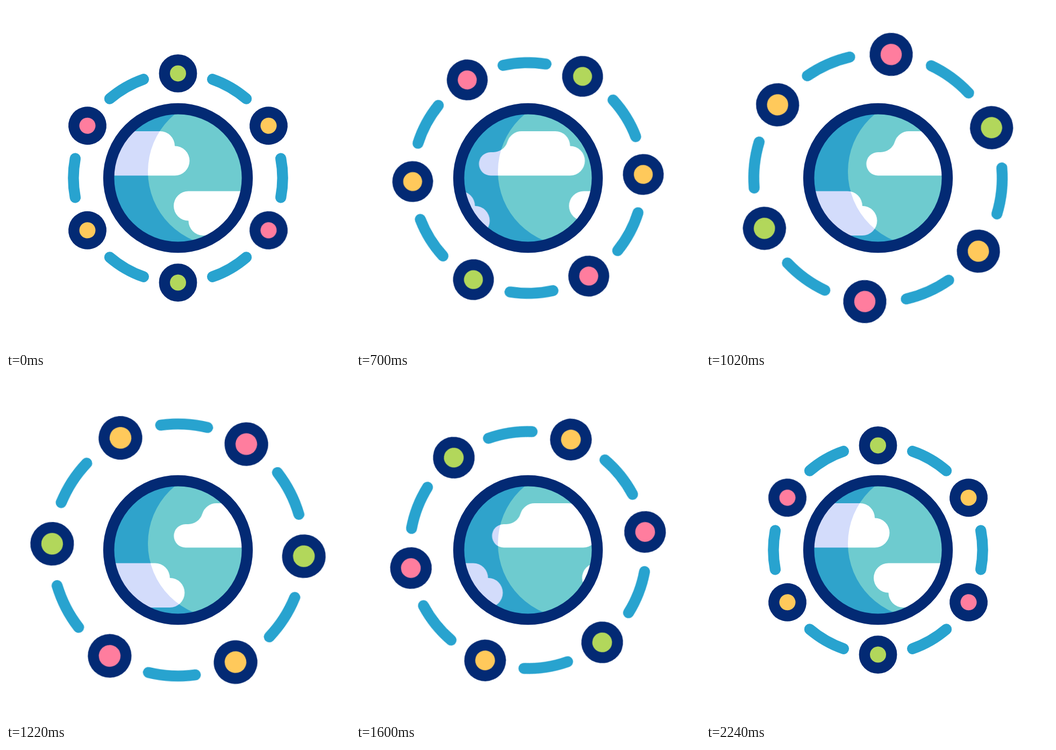
An HTML page without scripts for the animation above (2.4 s loop, 640 px wide and 640 px high).

```html
<!DOCTYPE html>
<html lang="en">
<head>
<meta charset="utf-8">
<title>Connected globe</title>
<style>
  html, body { margin: 0; width: 100%; height: 100%; overflow: hidden; background: #fff; }
  svg { display: block; width: 100vw; height: 100vh; }

  .spin, .grow, .drift {
    transform-origin: 0 0;
    animation: 2400ms cubic-bezier(.3333, 0, .6667, 1) infinite;
  }
  .spin { animation-name: spin; }
  .grow { animation-name: grow; }
  .drift { animation-name: drift; }

  /* rest until 200 ms, peak at 1200 ms, rest from 2200 ms */
  @keyframes spin {
    0%, 8.3333% { transform: rotate(0deg); }
    91.6667%, 100% { transform: rotate(180deg); }
  }
  @keyframes grow {
    0%, 8.3333%, 91.6667%, 100% { transform: scale(1); }
    50% { transform: scale(1.205); }
  }
  @keyframes drift {
    0%, 8.3333%, 91.6667%, 100% { transform: translateX(0); }
    50% { transform: translateX(168px); }
  }

  .node, .dash { stroke-width: 20.4; vector-effect: non-scaling-stroke; }
  .node { stroke: #032a74; }
  .dash { fill: none; stroke: #28a3cf; stroke-linecap: round; }
  .green { fill: #b2d75b; }
  .yellow { fill: #ffc95b; }
  .pink { fill: #ff7d9e; }
</style>
</head>
<body>
<svg viewBox="0 0 640 640">
  <defs>
    <clipPath id="disc"><circle cx="320" cy="320" r="122"/></clipPath>
    <mask id="shade" maskUnits="userSpaceOnUse" x="0" y="0" width="640" height="640">
      <rect width="640" height="640" fill="#fff"/>
      <circle cx="403" cy="308" r="139"/>
      <rect x="403" width="237" height="640"/>
    </mask>
    <g id="clouds">
      <path d="M166.2 315.5a21.75 21.75 0 0 1 0-43.5H171.1A27.5 27.5 0 0 0 197.4 252.5A27.5 27.5 0 0 1 223.7 233H286.5A27.5 27.5 0 0 1 314 260.5A27.5 27.5 0 0 1 314 315.5Z"/>
      <path d="M339.5 344.5A27.5 27.5 0 0 0 339.5 399.5A27.5 27.5 0 0 0 367 427H520V344.5Z"/>
      <path d="M0 344.5H109.5A27.5 27.5 0 0 1 137 372A27.5 27.5 0 0 1 137 427H0Z"/>
    </g>
    <path id="dash" class="dash" d="M191.2 -36.3A194.6 194.6 0 0 1 191.2 36.3"/>
    <circle id="node" class="node" cy="-194.6" r="25.2"/>
  </defs>

  <g transform="translate(320 320)">
    <g class="spin">
      <g class="grow">
        <use href="#dash"/>
        <use href="#dash" transform="rotate(60)"/>
        <use href="#dash" transform="rotate(120)"/>
        <use href="#dash" transform="rotate(180)"/>
        <use href="#dash" transform="rotate(240)"/>
        <use href="#dash" transform="rotate(300)"/>
        <use href="#node" class="green"/>
        <use href="#node" class="yellow" transform="rotate(60)"/>
        <use href="#node" class="pink" transform="rotate(120)"/>
        <use href="#node" class="green" transform="rotate(180)"/>
        <use href="#node" class="yellow" transform="rotate(240)"/>
        <use href="#node" class="pink" transform="rotate(300)"/>
      </g>
    </g>
  </g>

  <g clip-path="url(#disc)">
    <rect x="190" y="190" width="260" height="260" fill="#6ecbcf"/>
    <g class="drift" fill="#fff"><use href="#clouds"/></g>
    <g mask="url(#shade)">
      <rect x="190" y="190" width="260" height="260" fill="#2fa3cb"/>
      <g class="drift" fill="#d3dcfb"><use href="#clouds"/></g>
    </g>
  </g>
  <circle cx="320" cy="320" r="128.9" fill="none" stroke="#032a74" stroke-width="20.6"/>
</svg>
</body>
</html>
```
